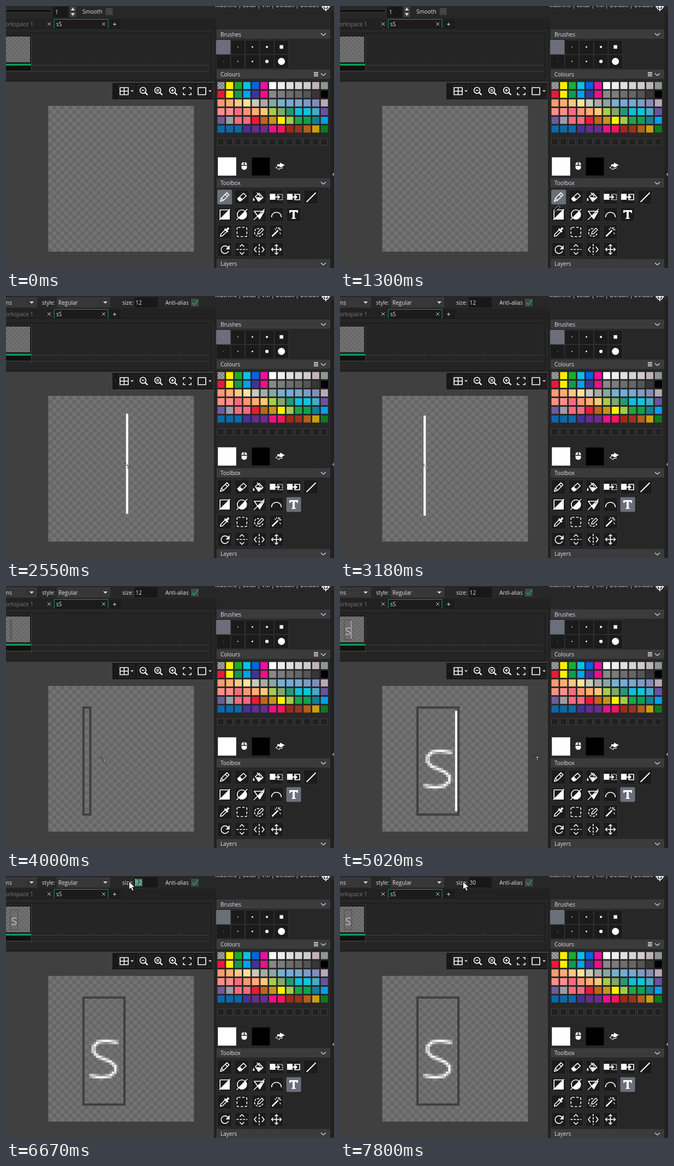
Write an HTML page that moves like this. It is 601 px wide and 480 px high and loops after 8000 ms.

```html
<!DOCTYPE html>
<html lang="en">
<head>
<meta charset="utf-8">
<title>Sprite editor</title>
<style>
html, body { margin: 0; width: 100%; height: 100%; overflow: hidden; background: #272727; }
svg { display: block; width: 100%; height: 100%; }
text { font: 10px "Open Sans", "Noto Sans", sans-serif; fill: #e2e2e2; white-space: pre; }
.icon { fill: none; stroke: #fff; stroke-width: 1.6; stroke-linejoin: round; }
.icon .f { fill: #fff; stroke: none; }
.icon .k { stroke: #1b1b1b; }
.cell { fill: #1b1b1b; stroke: #353535; }
.cell.on { fill: #6b6f7a; stroke: #6b6f7a; }
</style>
</head>
<body>
<svg id="stage" viewBox="0 0 601 480"></svg>
<script>
const LOOP = 8000;
const PX = 267 / 64;           // stage size of one sprite pixel
const OX = 77.3, OY = 183;     // sprite corner on the stage
const GREEN = '#109a58', DARK = '#181818', DROP = '#37373a';

const rect = (x, y, w, h, fill, more = '') =>
  `<rect x="${x}" y="${y}" width="${w}" height="${h}" fill="${fill}" ${more}/>`;
const path = (d, more = '') => `<path d="${d}" ${more}/>`;
const text = (x, y, s, more = '') => `<text x="${x}" y="${y}" ${more}>${s}</text>`;
const at = (x, y, body, more = '') => `<g transform="translate(${x} ${y})" ${more}>${body}</g>`;
const icon = (x, y, body) => at(x, y, body, 'class="icon"');
const solid = d => path(d, 'class="f"');
const cell = (x, y, w, h, on = false, id = '') =>
  `<rect x="${x}" y="${y}" width="${w}" height="${h}" rx="1" class="cell${on ? ' on' : ''}" ${id}/>`;
const down = (x, y, r = 4) => path(`M${x - r} ${y - r / 2}h${2 * r}l${-r} ${r}z`, 'fill="#ddd"');
const cross = x => path(`M${x - 3} 30l6 6m0 -6l-6 6`, 'stroke="#c8c8c8"');
const check = (id, s, a, b) => `<pattern id="${id}" width="${2 * s}" height="${2 * s}" patternUnits="userSpaceOnUse">
  ${rect(0, 0, 2 * s, 2 * s, a)}${path(`M0 0h${s}v${2 * s}h${s}v${-s}h${-2 * s}z`, `fill="${b}"`)}</pattern>`;

// Anti-aliased letter: coverage of each sprite pixel by a thin polyline
function letter() {
  const pts = [[30, 29.2], [25.5, 28.5], [22, 29], [19.9, 31], [20, 33.4], [21.6, 35.2], [27.5, 37.8],
    [29.6, 39.8], [29.5, 42], [27, 44], [23, 44.6], [19, 43.8]];
  const dist = (x, y) => Math.min(...pts.slice(1).map(([bx, by], i) => {
    const [ax, ay] = pts[i], ux = bx - ax, uy = by - ay;
    const k = Math.max(0, Math.min(1, ((x - ax) * ux + (y - ay) * uy) / (ux * ux + uy * uy)));
    return Math.hypot(x - ax - k * ux, y - ay - k * uy);
  }));
  let out = '';
  for (let y = 27; y < 46; y++) for (let x = 18; x < 31; x++) {
    const a = Math.min(1, 1.12 - dist(x + .5, y + .5));
    if (a > .05) out += rect(x, y, 1.02, 1.02, '#fff', `opacity="${a.toFixed(2)}"`);
  }
  return out;
}

function topBar() {
  const brush = rect(-2, 6.5, 85, 5, '#111', 'stroke="#3a3a3a"') + rect(86, 1, 28, 20, DARK) + text(90, 15, '1') +
    rect(117, 1, 11, 9, '#444') + rect(117, 11, 11, 9, '#444') +
    path('M119 8l3.5 -5l3.5 5zM119 13h7l-3.5 5z', 'fill="#ddd"') +
    text(140, 13.5, 'Smooth') + rect(182.5, 3.5, 13, 13, '#444');
  const type = rect(0, 2, 57, 19, DROP) + text(11, 15.5, 'ans', 'text-anchor="end"') + down(47, 12) +
    text(66, 15.5, 'style:') + rect(93, 2, 98, 19, DROP) + text(96, 15.5, 'Regular') + down(182, 12) +
    path('M39.5 3v17M173.5 3v17', 'stroke="#2b2b2b"') +
    text(213, 15.5, 'size:') + rect(236, 2, 42, 19, DARK) +
    rect(237, 5, 0, 14, '#39785a', 'id="sel"') + text(237.5, 15.5, '12', 'id="size"') +
    rect(237, 5, 1, 14, '#eee', 'id="bar"') +
    text(292, 15.5, 'Anti-alias') + rect(339, 5, 14, 14, '#464646') +
    path('M341 12l4 4l7 -9', `fill="none" stroke="${GREEN}" stroke-width="2"`);
  return `<g id="brushBar">${brush}</g><g id="typeBar">${type}</g>` +
    text(573, 2, 'Machine | Local | VM | Default | Default', 'text-anchor="end"') +
    icon(586, 1.5, '<circle r="5.3"/>' + path('M0 -8V8M-8 0H8') + '<circle r="2" class="f"/>');
}

function tabs() {
  return rect(0, 23, 385, 19, '#222') + text(50, 36.5, 'Workspace 1', 'text-anchor="end" style="fill:#777"') + cross(79) +
    rect(88, 24, 99, 18, '#1b1b1b') + path('M88.5 41V24.5H187V41', `fill="none" stroke="${GREEN}"`) +
    text(92, 36.5, 'sS') + cross(179) + rect(188, 25, 22, 17, '#1c1c1c') +
    path('M199 30.5v6m-3 -3h6', 'stroke="#ddd"') + rect(0, 41, 385, 1, '#191919');
}

function timeline() {
  return rect(-2, 49.5, 378, 87, '#252525', 'stroke="#171717"') +
    rect(-4, 55, 49, 49, 'url(#small)', 'stroke="#101010" stroke-width="1.5"') +
    rect(0, 106, 46, 3, GREEN) + rect(0, 110, 46, 8, '#101010') +
    path('M46.5 52V123M46 108.5H372M0 119.5H372M100.5 104v4m54 -4v4m54 -4v4m55 -4v4m55 -4v4',
      'stroke="#3e3e3e" fill="none"');
}

function viewBar() {
  const lens = '<circle cx="-1" cy="-1" r="5.5"/>' + path('M3 3L7.5 7.5', 'stroke-width="2.4"');
  return rect(195, 141, 185, 30, '#171717') + path('M200.5 153v6', 'stroke="#444" stroke-dasharray="1 1"') +
    [[206, 29], [240, 24], [267, 24], [293, 24], [320, 24], [349, 29]].map(([x, w]) =>
      rect(x + .5, 144.5, w, 23, '#1d1d1d', 'stroke="#2b2b2b"')).join('') +
    icon(216.5, 156, path('M-7.5 -6.5h15v13h-15zM0 -6V6M-7 0H7')) + down(231, 156, 3) +
    icon(252, 155.5, lens + path('M-3.5 -1h5')) + icon(279, 155.5, lens + path('M-3.5 -2.2h5m0 2.4h-5')) +
    icon(306, 155.5, lens + path('M-3.5 -1h5M-1 -3.5v5')) +
    icon(332, 156, path('M-7 -3V-6.5H-3M3 -6.5H7V-3M7 3V6.5H3M-3 6.5H-7V3')) +
    icon(359, 156, rect(-7, -6.5, 14, 13, 'none')) + down(374, 156, 3);
}

function header(y, name) {
  return rect(386, y, 208, 17, '#3b3b3d') + text(393, y + 12.5, name) +
    path(`M577 ${y + 7}l4.5 4l4.5 -4`, 'fill="none" stroke="#ddd" stroke-width="1.3"');
}

function brushes() {
  let out = '';
  [.8, 1.5, 2.5, 3.5, 6.5].forEach((s, i) => {
    const x = 398.3 + i * 26.6;
    out += cell(x - 13, 62.5, 26, 26, i === 0) + cell(x - 13, 89, 26, 26) +
      rect(x - s / 2, 75 - s / 2, s, s, '#fff') +
      `<circle cx="${x}" cy="101.5" r="${[.5, 1, 1.5, 3.1, 6.5][i]}" fill="#fff"/>`;
  });
  return out;
}

function palette() {
  const rows = [
    'url(#clear) #fe0 #1bad2c #0cc0e6 #0a63e0 #ee10a0 #fff #eee #e0e0e0 #d4d4d4 #ccc #bfb2b8 #909692',
    '#ec1838 #fe0 #109a50 #00a2e8 #40349a #ee1088 #888 #7c7c7c #6e6e6e #666 #555 #363636 #000',
    '#ff9a72 #ffae74 #ffc684 #ffe29c #c9c9bb #a9aaa8 #89a8a2 #78b0d0 #74aada #78aacc #7c9cc8 #858cba #b8a8b8',
    '#f99086 #f98f88 #f76c7c #fb9774 #feae70 #fec878 #a6cc48 #80a870 #289874 #10c0d8 #10c4dc #48a8c8 #6654a0',
    '#6c5c98 #9c9ca8 #f76a7c #f76880 #ec1c38 #c4641c #c8941c #fff000 #a2cc48 #18a848 #10a050 #108098 #00a0e8',
    '#0c68a8 #0c68a8 #0c68a8 #44309a #642c90 #6a2c90 #ee1088 #ee1860 #9c2a18 #983420 #b0601c #c8a010 #107820'];
  let out = '';
  for (let c = 0; c < 13; c++) {
    const x = 387.5 + c * 15.78;
    rows.forEach((row, r) => out += rect(x, 139.3 + r * 15.9, 13, 13, row.split(' ')[c]));
    out += rect(x, 243, 12, 12, '#202020', 'stroke="#424242"');
  }
  return out + path('M564 122h8m-8 3h8m-8 3h8', 'stroke="#eee" stroke-width="1.4"') +
    rect(388.5, 277.5, 33, 33, '#fff', 'stroke="#ccc"') + rect(450.5, 277.5, 33, 33, '#000', 'stroke="#151515"') +
    path('M422 293.5h28', 'stroke="#1b1b1b"') +
    icon(436.5, 293, rect(-5, -7, 10, 14, '#fff', 'rx="4.5" stroke="none"') + path('M-5 -1H5M0 -7V-1', 'class="k"')) +
    icon(502, 293, solid('M0 -6L9 -1.5L0 3V0H-5V-3H0z') + path('M-1 -1L-8 3L-1 7V4.5H4V1.5H-1z', 'stroke-width="1"'));
}

function tools() {
  const pencil = path('M-8 8L-6 2L4 -8L8 -4L-2 6zM1 -5L5 -1M-6 2L-2 6');
  const mini = path('M-3 4L-2 0L5 -7L8 -4L1 3z', 'stroke-width="1.3"');
  const half = body => body + path('M-10 10L10 -10', 'stroke-width="1.4"');
  const list = [
    pencil,
    path('M-8 3L3 -7L8 -2L-2 7H-5z') + solid('M-8 3L-4 -1L1 4L-2 7H-5z'),
    path('M-7 -1L0 -7L7 1L-1 8zM-4 -8L2 -1') + solid('M-5 0L6 1L-1 7zM-10 1q-3 6 0 6q3 0 0 -6z'),
    solid('M-12 -6h10v11h-10z') + path('M2 -5h9v10h-9z', 'stroke-dasharray="2 1.5"') + solid('M-2 -1H3V-4L7 0L3 4V1H-2z'),
    solid('M-12 -6h10v11h-10z') + path('M2 -5h9v10h-9z') + solid('M-2 -1H3V-4L7 0L3 4V1H-2z'),
    path('M-8 9L9 -8', 'stroke-width="2"'),
    half(path('M-8.5 -8.5h17v17h-17z') + solid('M9 9V-9L-9 9z')),
    half('<circle r="8.5"/>' + solid('M-6 6A8.5 8.5 0 0 0 6 -6z')),
    half(path('M-9 -6H9L1 8z') + solid('M9 -6L1 8L-3 3z')),
    path('M-9 5C-9 -7 9 -7 9 5'),
    solid('M-8 -8H8V-3H6L5 -5H2V6L4 7V8H-4V7L-2 6V-5H-5L-6 -3H-8z'),
    path('M-8 8L-7 4L1 -4L4 -1L-4 7z') + solid('M-1 -5L1 -7L3 -5L6 -9L9 -6L5 -3L7 -1L5 1z'),
    rect(-9, -8.5, 18, 17, 'none', 'rx="2" stroke-dasharray="4.5 3"'),
    mini + path('M0 -6C-8 -8 -11 2 -6 6S7 8 7 1', 'stroke-dasharray="4 2"'),
    path('M-8 8L3 -3', 'stroke-width="2.5"') + path('M4 -9v4M9 -4h-4M-3 -6l2 2M0 -9l1 3M6 1l2 3M7 -8l-2 2', 'stroke-width="1.3"'),
    path('M6 -4A7 7 0 1 0 7 3') + solid('M9 -8V0H2z'),
    path('M-10 0h20', 'stroke-dasharray="4 2"') + path('M-4 -5L0 -9L4 -5M-4 5L0 9L4 5'),
    path('M0 -10v20', 'stroke-dasharray="4 2"') + path('M-5 -5L-9 0L-5 5M5 -5L9 0L5 5'),
    path('M-8 0H8M0 -8V8') + path('M-3 -6L0 -9L3 -6M-3 6L0 9L3 6M-6 -3L-9 0L-6 3M6 -3L9 0L6 3')];
  const counts = [6, 5, 4, 4];
  let out = '', n = 0;
  counts.forEach((count, r) => {
    for (let c = 0; c < count; c++, n++) {
      const x = 400.7 + c * 31.6, y = 350 + r * 32;
      out += cell(x - 13, y - 13, 26, 26, false, `id="tool${n}"`) + icon(x, y, list[n]);
    }
  });
  return out;
}

const cursors = {
  arrow: path('M0 0V14L3.3 11L5.8 16.5L8.3 15.3L5.9 10H10.5z', 'fill="#fff" stroke="#111" stroke-width=".8"'),
  pencil: path('M0 0L1.5 -4L9 -11.5L12 -8.5L4 -1z', 'fill="#111" stroke="#eee" stroke-width=".8"'),
  type: path('M-3 0h6M0 -3v6', 'stroke="#222" stroke-dasharray="1 1"') +
    path('M2.5 3.5h6M5.5 4v5.5', 'stroke="#111" stroke-width="2.2"') + path('M3 3.5h5M5.5 3.5v5.5', 'stroke="#ddd"'),
  beam: path('M-2 -4.5h4M0 -4v8M-2 4.5h4', 'stroke="#bbb" fill="none"')
};

const stage = document.getElementById('stage');
stage.innerHTML = `<defs>${check('big', 267 / 36, '#666', '#737373')}${check('small', 3.7, '#666', '#737373')}
  ${check('clear', 3.2, '#777', '#aaa')}
  <g id="art"><rect id="frame" x="15.5" y="9.5" height="47" fill="none" stroke="#404040"/>
  <g id="glyph">${letter()}</g>${rect(0, 11, 1, 44, '#fff', 'id="caret"')}</g></defs>` +
  rect(0, 0, 601, 480, '#272727') + topBar() + tabs() + timeline() +
  rect(0, 139, 381, 341, '#404040') + rect(381, 42, 4, 438, '#222') + viewBar() +
  at(OX, OY, rect(0, 0, 267, 267, 'url(#big)')) +
  header(43, 'Brushes') + brushes() + header(116.5, 'Colours') + palette() +
  header(315.5, 'Toolbox') + tools() + header(463.5, 'Layers') +
  rect(595, 8, 6, 472, '#202020') + path('M601 305v7l-3.5 -3.5z', 'fill="#888"') +
  `<g id="drawn"><use href="#art" transform="translate(${OX} ${OY}) scale(${PX})"/>
  <use href="#art" transform="translate(-4 55) scale(.766)"/></g>` +
  rect(0, 0, PX, PX * 44, '#fff', 'id="ghost"') +
  Object.entries(cursors).map(([k, body]) => `<g id="${k}">${body}</g>`).join('');

const $ = id => document.getElementById(id);
const set = (id, attrs) => { for (const k in attrs) $(id).setAttribute(k, attrs[k]); };
const show = (id, on) => set(id, { visibility: on ? 'visible' : 'hidden' });

// Pointer track: time, x, y
const track = [[70, 483, 455], [350, 415, 430], [690, 373, 401], [1020, 373, 401], [1300, 391, 377], [1500, 455, 372],
  [1790, 529, 381], [1860, 529, 381], [1990, 480, 345], [2130, 395, 318], [2260, 325, 311], [2550, 218.5, 306.5],
  [2640, 195, 305], [2850, 168, 302], [3180, 154, 310], [3320, 143, 313], [3460, 148, 314],
  [3930, 148, 314], [4250, 270, 318], [4560, 356, 310], [5040, 356, 310], [5250, 360, 295], [5500, 330, 160],
  [5780, 279, 41], [5920, 274, 19], [6050, 264, 14], [6200, 255, 13], [6600, 225, 6], [6670, 225.5, 10.5]];

function pointer(t) {
  const i = track.findIndex(k => k[0] > t);
  if (i === 0) return track[0].slice(1);
  if (i < 0) return track[track.length - 1].slice(1);
  const [t0, x0, y0] = track[i - 1], [t1, x1, y1] = track[i], k = (t - t0) / (t1 - t0);
  return [x0 + (x1 - x0) * k, y0 + (y1 - y0) * k];
}

function cursorKind(t, x, y) {
  if (t < 70) return '';
  if (t < 1860) return x < 393 ? 'pencil' : 'arrow';
  if (x < 381 && y > 171) return 'type';
  return y < 22 && x > 235 && x < 282 ? 'beam' : 'arrow';
}

function draw(t) {
  const [x, y] = pointer(t), kind = cursorKind(t, x, y);
  for (const k in cursors) show(k, k === kind);
  if (kind) set(kind, { transform: `translate(${x} ${y})` });

  const typing = t >= 1860, placed = t >= 3530, typed = t >= 5020;
  show('brushBar', !typing);
  $('typeBar').style.display = typing ? '' : 'none';
  $('tool0').classList.toggle('on', !typing);
  $('tool10').classList.toggle('on', typing);

  // Before the click the caret follows the pointer, one sprite column at a time
  show('ghost', kind === 'type' && !placed);
  set('ghost', { x: 78 + PX * Math.floor((x - 78) / PX + .75), y: y - 91 });

  $('drawn').style.display = placed ? '' : 'none';
  set('frame', { width: typed ? 18 : 3 });
  show('glyph', typed);
  set('caret', { x: typed ? 32 : 17 });
  show('caret', t < 6200 && (t - (typed ? 5020 : 3430)) % 1000 < 500);

  const start = Math.max(237, Math.min(250, x));
  set('sel', { x: start, width: t >= 6200 && t < 7270 ? 250 - start : 0 });
  $('size').textContent = t < 7270 ? '12' : t < 7340 ? '3' : '30';
  set('bar', { x: t < 7270 ? 237 : t < 7340 ? 243.5 : 249 });
  show('bar', typing && (t >= 6500 && t < 6930 || t >= 7270 && t < 7800));
}

function tick(now) {
  draw(now % LOOP);
  requestAnimationFrame(tick);
}
draw(0);
requestAnimationFrame(tick);
</script>
</body>
</html>
```
